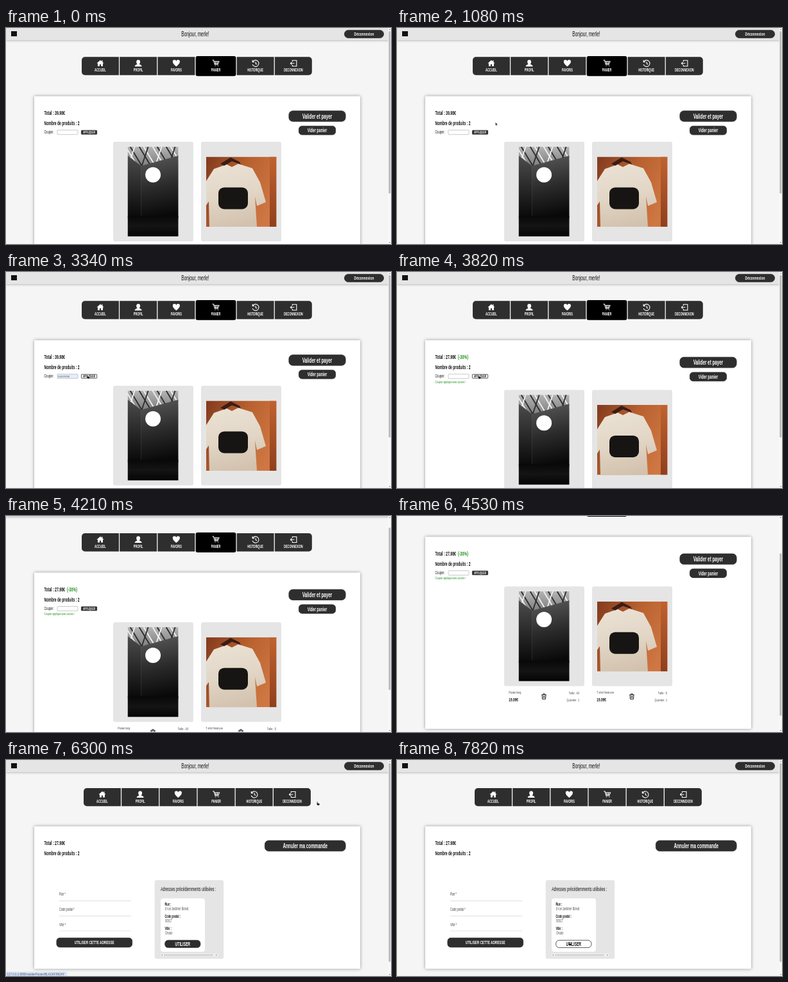
An HTML page with a canvas that plays this animation: 600x338 px, repeating every 8000 ms.

```html
<!DOCTYPE html>
<html lang="fr">
<head>
<meta charset="utf-8">
<title>Panier</title>
<style>
  html, body { margin: 0; width: 100%; height: 100%; overflow: hidden; background: #f5f5f5; }
  canvas { display: block; width: 100vw; height: 100vh; }
</style>
</head>
<body>
<canvas></canvas>
<script>
const W = 600, H = 338, LOOP = 8000;
const INK = '#2e2e2e', GREY = '#e5e5e5', GREEN = '#1d8f1d';
const CONDENSED = [0.7, 1.14], NORMAL = [1, 1]; // type proportions
const canvas = document.querySelector('canvas');
const ctx = canvas.getContext('2d');
let scale = 1;

const clamp = (v) => Math.min(1, Math.max(0, v));
const ramp = (t, from, to) => { const p = clamp((t - from) / (to - from)); return p * p * (3 - 2 * p); };
const within = (t, from, to) => t >= from && t < to;

// Linear interpolation in rows of [time, ...values]
function track(rows, t) {
  if (t <= rows[0][0]) return rows[0].slice(1);
  for (let i = 1; i < rows.length; i++) {
    const a = rows[i - 1], b = rows[i];
    if (t < b[0]) {
      const p = (t - a[0]) / (b[0] - a[0]);
      return a.slice(1).map((v, k) => v + (b[k + 1] - v) * p);
    }
  }
  return rows.at(-1).slice(1);
}

function box(x, y, w, h, fill, r = 0, stroke) {
  ctx.beginPath();
  ctx.roundRect(x, y, w, h, r);
  if (fill) { ctx.fillStyle = fill; ctx.fill(); }
  if (stroke) { ctx.strokeStyle = stroke; ctx.lineWidth = 0.8; ctx.stroke(); }
}

function poly(fill, ...points) {
  ctx.beginPath();
  for (let i = 0; i < points.length; i += 2) ctx.lineTo(points[i], points[i + 1]);
  ctx.closePath();
  ctx.fillStyle = fill;
  ctx.fill();
}

function disc(x, y, r, fill) {
  ctx.beginPath();
  ctx.arc(x, y, r, 0, 7);
  ctx.fillStyle = fill;
  ctx.fill();
}

function shade(x0, y0, x1, y1, ...colors) {
  const g = ctx.createLinearGradient(x0, y0, x1, y1);
  colors.forEach((c, i) => g.addColorStop(i / (colors.length - 1), c));
  return g;
}

function text(s, x, y, size, { color = '#111', bold = false, align = 'left', face = CONDENSED } = {}) {
  ctx.save();
  ctx.translate(x, y);
  ctx.scale(...face);
  ctx.font = `${bold ? 'bold ' : ''}${size}px "Liberation Sans", Arial, sans-serif`;
  ctx.textAlign = align;
  ctx.fillStyle = color;
  ctx.fillText(s, 0, 0);
  ctx.restore();
}

function button(x, y, w, h, label, size, hover = 0, r = 5) {
  const grey = (v) => `rgb(${v},${v},${v})`;
  const back = 46 + 209 * hover, front = 255 - 235 * hover;
  box(x + 0.4, y + 0.4, w - 0.8, h - 0.8, grey(back), r, INK);
  text(label, x + w / 2, y + h / 2 + size * 0.41, size, { color: grey(front), bold: true, align: 'center' });
}

function panel(y, h) {
  ctx.save();
  ctx.shadowColor = 'rgba(0,0,0,.4)';
  ctx.shadowBlur = 5 * scale;
  box(44, y, 508, h, '#fff', 1);
  ctx.restore();
}

// Icons on a 24 x 24 grid: [path, filled]
const ICONS = {
  ACCUEIL: ['M12 2L1 12h3v9h6v-6h4v6h6v-9h3L19 8V3h-3v3z', true],
  PROFIL: ['M12 1c4 0 6 3 6 6 0 4-2 7-3 8 4 1 8 3 8 7H1c0-4 4-6 8-7-1-1-3-4-3-8 0-3 2-6 6-6z', true],
  FAVORIS: ['M12 22C5 16 1 12 1 7.500a5.500 5.500 0 0 1 11-2 5.500 5.500 0 0 1 11 2C23 12 19 16 12 22z', true],
  PANIER: ['M1 2h4l4 14h11M6 6h16l-3 7H8M11 6v7M16 6v7M9 20h2M18 20h2', false],
  HISTORIQUE: ['M4 7a10 10 0 1 1-1 8M3 2v6h6M13 7v6l4 2', false],
  DECONNEXION: ['M9 7V3h13v18H9v-4M15 12H3M7 8l-4 4 4 4', false],
};
const TRASH = 'M3 6h18M9 6V2h6v4M5 6l1 16h12l1-16M10 10v8M14 10v8';

function icon(path, filled, cx, cy, size, color) {
  ctx.save();
  ctx.translate(cx - size / 2, cy - size / 2);
  ctx.scale(size / 24, size / 24);
  ctx.fillStyle = ctx.strokeStyle = color;
  ctx.lineWidth = 2.2;
  const p = new Path2D(path);
  filled ? ctx.fill(p) : ctx.stroke(p);
  ctx.restore();
}

function header() {
  ctx.save();
  ctx.shadowColor = 'rgba(0,0,0,.4)';
  ctx.shadowBlur = 4 * scale;
  box(0, -4, W, 23, GREY);
  ctx.restore();
  box(8, 5, 9, 8, '#111');
  text('Bonjour, merle!', 295, 13, 9.2, { align: 'center' });
  button(527, 3, 62, 13, 'Déconnexion', 7, 0, 6);
}

function nav(x, y, h, active) {
  Object.entries(ICONS).forEach(([label, [path, filled]], i) => {
    const on = label === active, w = on ? 62.8 : 57.9;
    const r = on ? 3 : i === 0 ? [5, 0, 0, 5] : i === 5 ? [0, 5, 5, 0] : 0;
    box(x, on ? y - 1.4 : y, w, on ? h + 2.8 : h, on ? '#000' : INK, r);
    icon(path, filled, x + w / 2, y + 10, 12, '#fff');
    text(label, x + w / 2, y + 23, 5.7, { color: '#fff', bold: true, align: 'center' });
    x += w + 1.3;
  });
}

function poster() {
  box(0, 0, 79, 140.5, shade(0, 0, 0, 40, '#b4b4b4', '#6d6d6d'));
  ctx.lineWidth = 1.8;
  for (let i = 0; i < 14; i++) {
    ctx.strokeStyle = i % 2 ? '#f2f2f2' : '#2b2b2b';
    ctx.beginPath();
    ctx.moveTo(i * 7 - 10, 0);
    ctx.lineTo(i % 3 ? i * 7 + 8 : i * 7 - 20, 30);
    ctx.stroke();
  }
  poly(shade(0, 14, 0, 112, '#4c4c4c', '#292929', '#080808'), 0, 14, 21, 30, 21, 118, 0, 112);
  poly(shade(21, 20, 40, 112, '#555', '#2b2b2b', '#080808'), 21, 30, 79, 14, 79, 112, 21, 118);
  box(0, 108, 79, 32.5, shade(0, 108, 0, 140, '#080808', '#141414', '#050505'));
  disc(39.5, 44, 12, '#fff');
}

function shirt() {
  box(0, 0, 109.5, 109.5, shade(0, 10, 109, 60, '#853c1f', '#b9612f', '#cf7743'));
  box(99, 0, 10.5, 109.5, shade(0, 0, 0, 109, '#c0622f', '#8f3f1e'));
  poly(shade(30, 12, 50, 109, '#eae1d3', '#e2d6c6', '#d2c1ad'), 12, 19, 32, 12, 40, 16, 50, 11, 72, 18,
    84, 40, 93, 71, 79, 77, 76, 62, 79, 109.5, 5, 109.5, 4, 70, 0, 76, 0, 38);
  poly('#3a1d14', 22, 11, 38, 1, 52, 8, 54, 12, 40, 7, 28, 14);
  box(19, 48, 46, 34, '#171513', 9);
}

function picture(draw, x, y, w, h, zoom = 1) {
  ctx.save();
  ctx.translate(x + w / 2, y + h / 2);
  ctx.scale(zoom, zoom);
  ctx.translate(-w / 2, -h / 2);
  ctx.beginPath();
  ctx.rect(0, 0, w, h);
  ctx.clip();
  draw();
  ctx.restore();
}

function product(x, y, name, size) {
  const small = { color: '#444' }, right = { color: '#444', align: 'right' };
  box(x, y, 125, 156, GREY, 3);
  text(name, x + 7.3, y + 168, 5.4, small);
  text('19.99€', x + 7.3, y + 180, 6.9, { bold: true });
  text('Taille : ' + size, x + 117, y + 168.8, 5.4, right);
  text('Quantité : 1', x + 117, y + 179.5, 5.4, right);
  icon(TRASH, false, x + 62, y + 172, 10, '#111');
}

function coupon(t, applied) {
  const filled = within(t, 2130, 3420), open = within(t, 1890, 2290);
  text('Coupon :', 59.5, 165, 5.6);
  box(80, 159.8, 32, 6.9, filled ? '#e3edfb' : '#fff', 0.6, '#bbb');
  if (filled) text('BLACKFRIDAY', 81.5, 164.7, 3.7, { color: '#555' });
  if (within(t, 1890, 2130) || within(t, 2290, 2450)) box(81, 161, 0.5, 4.5, '#111');
  button(117, 159.8, 25, 6.8, 'APPLIQUER', 4.65, ramp(t, 2980, 3150) * (1 - ramp(t, 3820, 3950)), 0.5);
  if (applied) text('Coupon appliqué avec succès !', 59.5, 173.5, 4.9, { color: GREEN });
  if (open) {
    box(80.5, 168, 49, 14, '#fff', 1, '#ccc');
    if (filled) box(81, 170, 48, 9, '#e8e8e8');
    text('BLACKFRIDAY', 83.5, 176.3, 4.4);
  }
}

function totals(y, total) {
  text(total, 59.5, y, 7.4, { bold: true });
  text('Nombre de produits : 2', 59.5, y + 15.7, 7.2, { bold: true });
}

function cartPage(t, scroll) {
  const applied = t >= 3420, drop = applied ? 6.5 : 0, cardY = 178 + drop;
  const buttonY = 129.3 + drop * 0.55;
  ctx.save();
  ctx.translate(0, -scroll);
  header();
  nav(118, 45.3, 28.5, 'PANIER');
  panel(106.7, 300.5);
  totals(136.3, applied ? 'Total : 27.98€' : 'Total : 39.98€');
  if (applied) text('(-30%)', 95, 136.3, 7.6, { color: GREEN, bold: true });
  button(440.5, buttonY, 89, 17.3, 'Valider et payer', 9, ramp(t, 5320, 5480), 6);
  button(456, buttonY + 23.7, 58, 14.5, 'Vider panier', 7.6);
  product(167, cardY, 'Poster long', 'A3');
  product(304, cardY, 'T-shirt Vestrune', 'S');
  picture(poster, 189.6, cardY + 7.7, 79, 140.5);
  picture(shirt, 312, cardY + 23.4, 109.5, 109.5, 1 + 0.03 * ramp(t, 4720, 4920) * (1 - ramp(t, 5060, 5260)));
  coupon(t, applied);
  ctx.restore();
}

function addressPage(t) {
  header();
  nav(121, 44, 28.2);
  panel(103.7, 223);
  totals(133.3, 'Total : 27.98€');
  button(403, 125.7, 126.5, 17.3, 'Annuler ma commande', 9, 0, 6);
  ['Rue *', 'Code postal *', 'Ville *'].forEach((label, i) => {
    text(label, 83, 211.7 + i * 24, 5.6, { color: '#444' });
    box(83, 220 + i * 23.7, 112, 0.7, '#d4d4d4');
  });
  button(78.5, 278, 118.5, 15.3, 'UTILISER CETTE ADRESSE', 6.7);
  box(231.7, 188, 107.5, 123, GREY, 3);
  text('Adresses précédemments utilisées :', 241, 205, 7.7);
  box(241, 216.5, 69, 83.5, '#fff', 4);
  [['Rue :', '8 rue Jardinier Bolvat'], ['Code postal :', '00917'], ['Ville :', 'Orvale']].forEach(([label, value], i) => {
    text(label, 247.5, 228 + i * 19, 5.5, { bold: true });
    text(value, 248, 235.3 + i * 19, 5.5, { color: '#555' });
  });
  button(247.3, 281.7, 56, 12.3, 'UTILISER', 7.4, ramp(t, 7440, 7580), 5);
  box(241, 303, 89, 4.5, '#f0f0f0');
  box(246, 304, 77, 2.5, '#d2d2d2', 1);
  poly('#999', 242, 305.2, 244, 304, 244, 306.5);
  poly('#999', 329, 305.2, 327, 304, 327, 306.5);
}

function scrollbar(top, height) {
  box(595.5, 0, 4.5, H, '#f8f8f8');
  box(596.4, top, 2.8, height, '#b9b9b9', 1.2);
  poly('#777', 596.6, 3, 599, 3, 597.8, 1.5);
  poly('#777', 596.6, 335, 599, 335, 597.8, 336.5);
}

function status(t) {
  const url = within(t, 4720, 5330) ? '127.0.0.1:8080/product/9'
    : within(t, 5330, 6540) ? '127.0.0.1:8080/validerPanier/BLACKFRIDAY' : '';
  if (!url) return;
  box(0, 331.3, url.length * 2.35 + 1, 7, '#dbe6f6', [0, 1, 0, 0]);
  text(url, 1.5, 336.5, 4.5, { color: '#44546e', face: NORMAL });
}

const POINTER = [
  [520, 489, 128], [680, 400, 160], [840, 270, 164], [1000, 180, 155], [1080, 153.5, 147.5],
  [1320, 121, 146], [1400, 115, 150], [1640, 97, 161], [1890, 97, 161], [2130, 100, 175],
  [2290, 97, 176], [2610, 97, 176], [2900, 112, 170], [3170, 126, 161], [3820, 126, 161], [4130, 230, 205],
  [4680, 350, 190], [5000, 425, 125], [5160, 465, 87], [5320, 480, 72], [5480, 484.5, 65], [6300, 484.5, 65],
  [6620, 427, 104], [6780, 425, 106], [7200, 330, 205], [7580, 270, 285.5], [7660, 269, 285], [7820, 267.5, 284.5],
];
const ARROW = new Path2D('M0 0V5.200L1.200 4.100 2 6 2.900 5.600 2.100 3.800H3.700Z');
const HAND = new Path2D('M.6 0Q1.400-.2 1.500.6V2.300L4 2.800Q4.700 3 4.500 4L4 6H1.300L-.7 3.700Q-.6 3 .1 3.400V.6Q.1 0 .6 0Z');
const BEAM = new Path2D('M-.8-2.500H.8M0-2.500V2.500M-.8 2.500H.8');

function pointer(t) {
  if (t < 520 || within(t, 4130, 4680)) return;
  const [x, y] = track(POINTER, t);
  const hand = within(t, 3000, 3900) || within(t, 4680, 6380) || t > 7440;
  ctx.save();
  ctx.translate(x, y);
  ctx.lineWidth = 0.7;
  if (within(t, 1600, 1950)) {
    ctx.strokeStyle = '#111';
    ctx.stroke(BEAM);
  } else {
    const shape = hand ? HAND : ARROW;
    ctx.fillStyle = '#111';
    ctx.fill(shape);
    ctx.strokeStyle = '#fff';
    ctx.lineWidth = 0.5;
    ctx.stroke(shape);
  }
  ctx.restore();
}

const SCROLL = [[4130, 0], [4210, 18], [4300, 42], [4400, 63], [4500, 73], [4580, 76]];

function draw(t) {
  scale = devicePixelRatio * innerWidth / W;
  const w = Math.round(innerWidth * devicePixelRatio), h = Math.round(innerHeight * devicePixelRatio);
  if (canvas.width !== w || canvas.height !== h) { canvas.width = w; canvas.height = h; }
  ctx.setTransform(w / W, 0, 0, h / H, 0, 0);
  box(0, 0, W, H, '#f5f5f5');
  if (t < 6160) {
    const [scroll] = track(SCROLL, t);
    cartPage(t, scroll);
    scrollbar(5 + scroll * 0.72, 254);
  } else {
    addressPage(t);
    scrollbar(5, 311);
  }
  status(t);
  pointer(t);
}

const start = performance.now();
function frame() {
  draw((performance.now() - start) % LOOP);
  requestAnimationFrame(frame);
}
frame();
</script>
</body>
</html>
```
